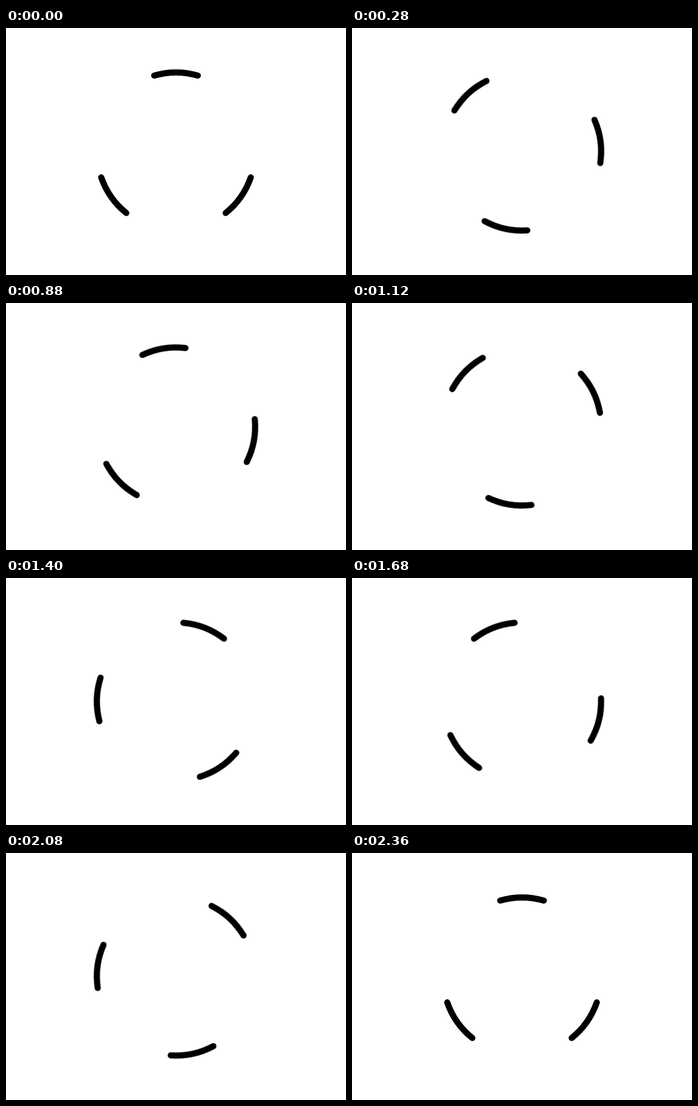
Write an HTML page that moves like this. It is 550 px wide and 400 px high and loops after 2400 ms.

```html
<!DOCTYPE html>
<html lang="en">
<head>
<meta charset="utf-8">
<title>Rotating arcs</title>
<style>
  html, body { margin: 0; width: 100%; height: 100%; overflow: hidden; background: #fff; }
  svg { display: block; width: 550px; height: 400px; }
  #ring {
    fill: none;
    stroke: #000;
    stroke-width: 10;
    stroke-linecap: round;
    transform-origin: 275px 200px;
  }
</style>
</head>
<body>
<svg viewBox="0 0 550 400"><g id="ring"></g></svg>
<script>
  const CX = 275, CY = 200, R = 128, HALF = 16;
  const ring = document.getElementById('ring');

  // Point on the circle, degrees clockwise from the top
  const point = deg => {
    const a = deg * Math.PI / 180;
    return `${(CX + R * Math.sin(a)).toFixed(2)} ${(CY - R * Math.cos(a)).toFixed(2)}`;
  };

  for (const mid of [0, 125.1, -125.1]) {
    const arc = document.createElementNS('http://www.w3.org/2000/svg', 'path');
    arc.setAttribute('d', `M${point(mid - HALF)} A${R} ${R} 0 0 1 ${point(mid + HALF)}`);
    ring.append(arc);
  }

  // 60 held poses of 40 ms; the first and last coincide
  ring.animate(
    { transform: ['rotate(0deg)', 'rotate(-360deg)'] },
    { duration: 2400, iterations: Infinity, easing: 'steps(60, jump-none)' }
  );
</script>
</body>
</html>
```
